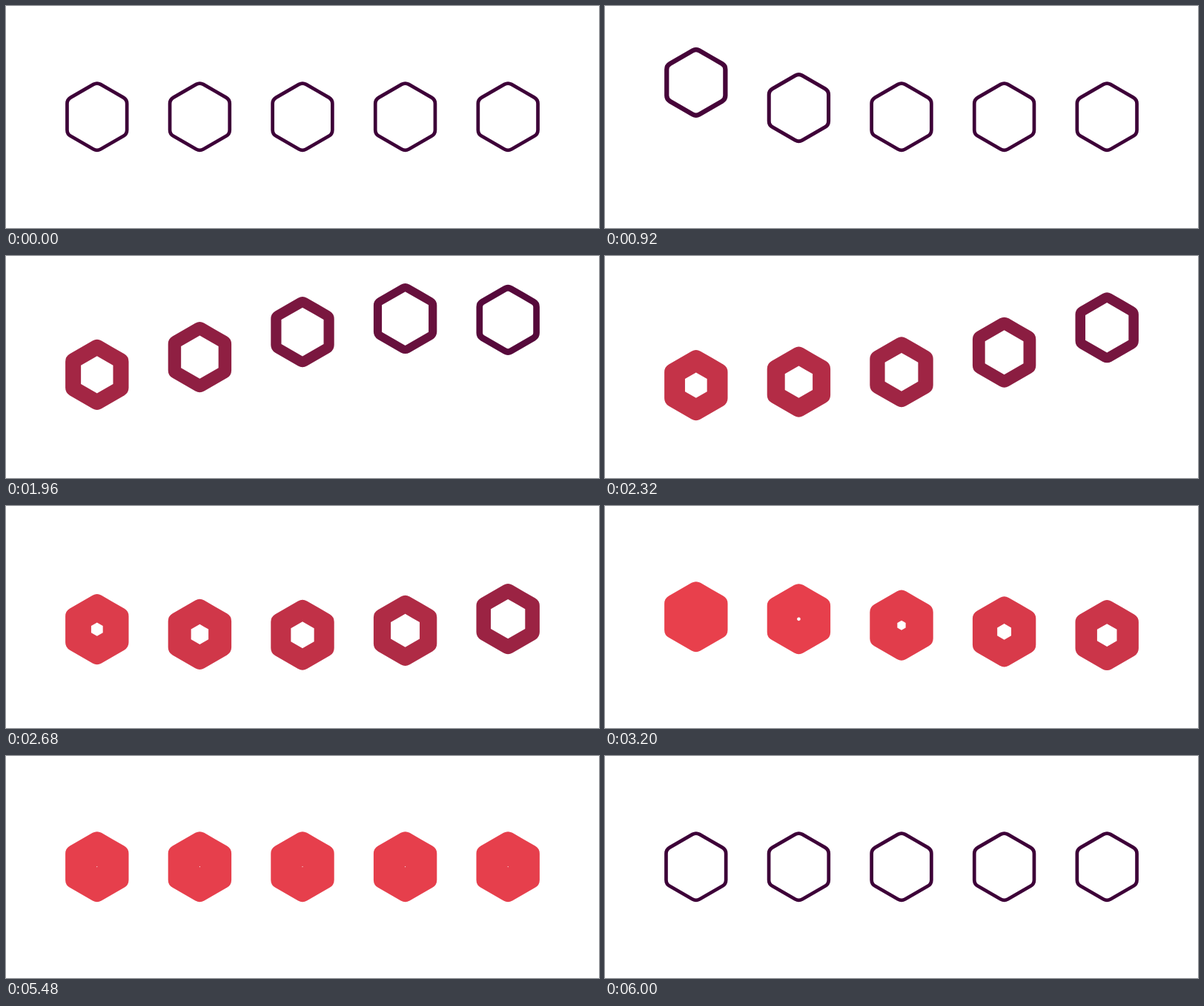
Animation, 800 px wide and 300 px high, one loop 6.04 s. Source, as an HTML page with a canvas:

```html
<!DOCTYPE html>
<html lang="en">
<head>
<meta charset="utf-8">
<title>Hexagon wave</title>
<style>
  html, body { margin: 0; width: 100%; height: 100%; overflow: hidden; background: #fff; }
  canvas { display: block; width: 800px; height: 300px; }
</style>
</head>
<body>
<canvas id="stage" width="800" height="300"></canvas>
<script>
const ctx = document.getElementById('stage').getContext('2d');

const LOOP = 6040, STEP = 40;
const COUNT = 5, STAGGER = 200, GAP = 138.6, CX = 122.8, CY = 149.7;
const APOTHEM = 42.7, CORNER = 12, THIN = 4.7;
const START = 560, TOP = 1320, BOTTOM = 2360, END = 3160;
const RESET = 5440, RESET_END = 6000;
const HIGH = -65.6, LOW = 25;
const DARK = [61, 0, 56], RED = [232, 64, 76];

const mix = (a, b, p) => a + (b - a) * p;
const clamp = v => Math.min(1, Math.max(0, v));
const span = (t, from, to) => clamp((t - from) / (to - from));

// Cubic Bezier easing, solved by bisection.
function bezier(x1, y1, x2, y2) {
  const at = (s, a, b) => 3 * (1 - s) * (1 - s) * s * a + 3 * (1 - s) * s * s * b + s * s * s;
  return x => {
    if (x <= 0 || x >= 1) return clamp(x);
    let lo = 0, hi = 1;
    for (let i = 0; i < 24; i++) {
      const mid = (lo + hi) / 2;
      if (at(mid, x1, x2) < x) lo = mid; else hi = mid;
    }
    return at(lo, y1, y2);
  };
}

const easeRise = bezier(0.33, 0, 0.29, 1);
const easeFall = bezier(0.325, 0, 0.355, 1);
const easeSettle = bezier(0.36, 0, 0.7, 1);
const easeFill = bezier(0.333, 0, 0.8, 0.85);
const easeColor = bezier(0.333, 0, 0.6, 1);
const easeReset = bezier(0.333, 0, 0.667, 1);

function offset(t) {
  if (t < TOP) return mix(0, HIGH, easeRise(span(t, START, TOP)));
  if (t < BOTTOM) return mix(HIGH, LOW, easeFall(span(t, TOP, BOTTOM)));
  return mix(LOW, 0, easeSettle(span(t, BOTTOM, END)));
}

function hexagon(x, y, apothem, radius) {
  const size = apothem * 2 / Math.sqrt(3);
  const point = i => {
    const a = i * Math.PI / 3 - Math.PI / 2;
    return [x + size * Math.cos(a), y + size * Math.sin(a)];
  };
  const [ax, ay] = point(0), [bx, by] = point(1);
  ctx.moveTo((ax + bx) / 2, (ay + by) / 2);
  for (let i = 1; i <= 6; i++) ctx.arcTo(...point(i), ...point(i + 1), radius);
  ctx.closePath();
}

function draw(time) {
  ctx.fillStyle = '#fff';
  ctx.fillRect(0, 0, 800, 300);
  const back = 1 - easeReset(span(time, RESET, RESET_END));
  for (let i = 0; i < COUNT; i++) {
    const t = time - i * STAGGER;
    const p = span(t, START, END);
    const width = mix(THIN, APOTHEM, easeFill(p) * back);
    const tint = easeColor(p) * back;
    const rgb = DARK.map((c, k) => Math.round(mix(c, RED[k], tint)));
    const x = CX + i * GAP, y = CY + offset(t);
    ctx.fillStyle = `rgb(${rgb})`;
    ctx.beginPath();
    hexagon(x, y, APOTHEM, CORNER);
    if (width < APOTHEM - 0.01) {
      hexagon(x, y, APOTHEM - width, Math.max(0, CORNER - width));
    }
    ctx.fill('evenodd');
  }
}

let origin = null;
function tick() {
  const now = performance.now();
  if (origin === null) origin = now;
  const time = (now - origin) % LOOP;
  draw(Math.floor(time / STEP) * STEP);
  requestAnimationFrame(tick);
}
tick();
</script>
</body>
</html>
```
